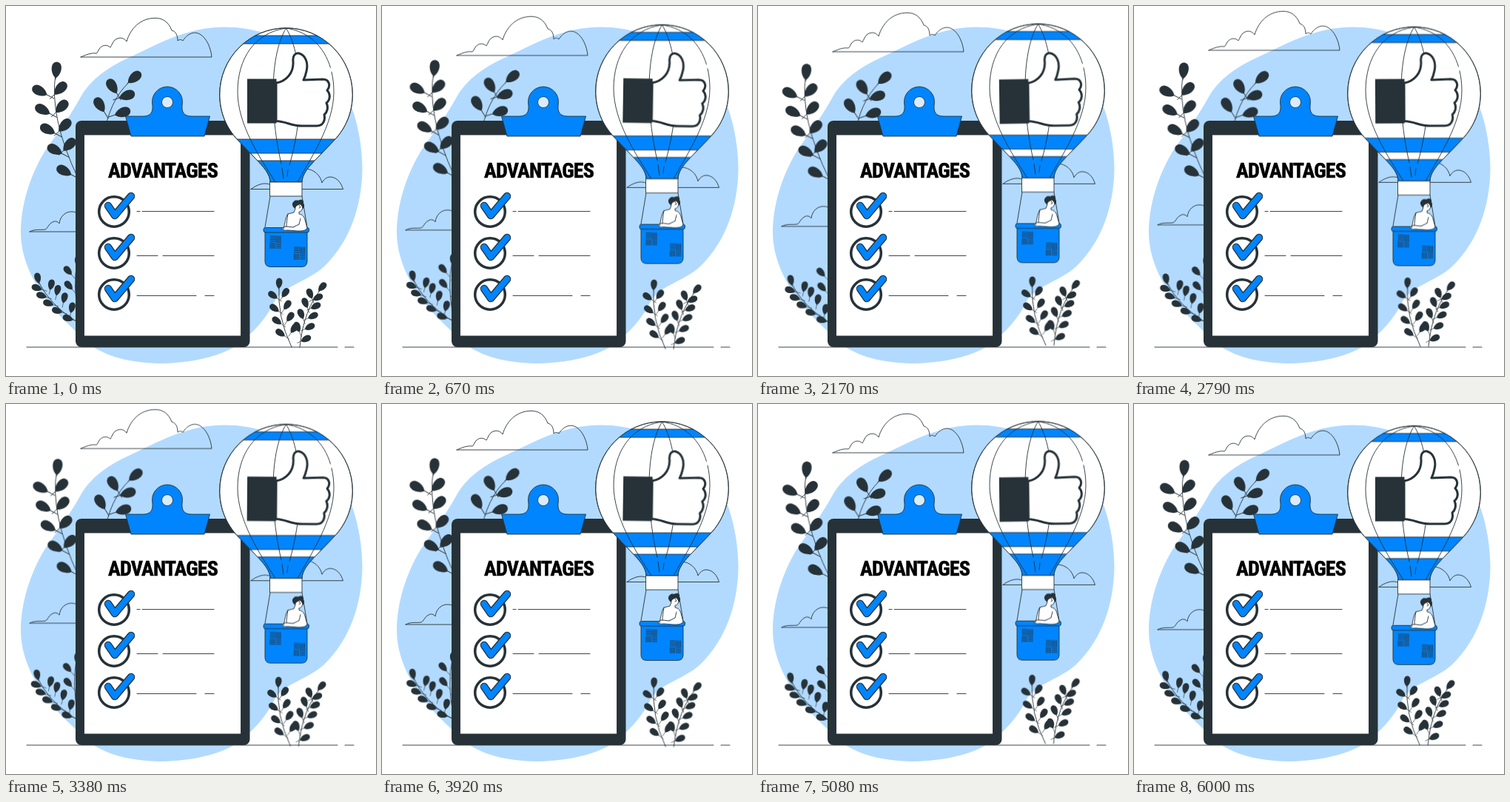
An HTML page for the animation above (6040 ms loop, 500x500 px).

```html
<!DOCTYPE html>
<html lang="en">
<head>
<meta charset="utf-8">
<title>Advantages</title>
<style>
  html, body { margin: 0; width: 100%; height: 100%; overflow: hidden; background: #fff; }
  svg { display: block; width: 100%; height: 100%; }
  .line { fill: none; stroke: #263238; stroke-width: 0.9; stroke-linecap: round; stroke-linejoin: round; }
  .blue { fill: #0085ff; stroke: #263238; stroke-width: 0.9; stroke-linejoin: round; }
  .white { fill: #fff; stroke: #263238; stroke-width: 0.9; stroke-linejoin: round; }
  .dark { fill: #263238; }
  #plants { transform-origin: 235px 269px; }
  #thumb { transform-origin: 382px 113px; }
  #title {
    font-family: "Oswald", "Roboto Condensed", "Open Sans Condensed", "Noto Sans", "Liberation Sans", sans-serif;
    font-weight: 700; font-stretch: extra-condensed; letter-spacing: -0.03em;
    text-anchor: middle; fill: #000; stroke: #000; stroke-width: 0.5;
  }
</style>
</head>
<body>
<svg viewBox="0 0 500 500">
  <defs>
    <path id="envelope" d="M288.7 119.5 A89.8 89.8 0 0 1 468.3 119.5 C468.3 144 459 165 444 181 L420 206 C408 218 400 228 400 238 H357 C357 228 349 218 337 206 L313 181 C298 165 288.7 144 288.7 119.5 Z"/>
    <clipPath id="inside"><use href="#envelope"/></clipPath>
    <path id="leaf" d="M0 10.5 C-8 5 -9.5 -11 0 -11.5 C9.5 -11 8 5 0 10.5 Z"/>
  </defs>

  <path fill="#b2daff" d="M295 28.5 C365 27 435 75 462 125 C475 152 481.500 190 481.500 220 C481 270 465 318 430 352 C406 373 378 377 364 397 C352 422 335 442 308 461 C280 477 240 483 207 483 C165 482 137 473 117 460 C97 442 76 424 60 404 C36 374 20 340 20 306 C20 270 32 230 52 197 C72 168 86 150 102 121 C118 95 143 80 172 67 C212 48 246 29 295 28.500 Z"/>

  <g class="line cloud">
    <path d="M101 69 H278 C277 57 271 43 262 38 C253 33 244 39 239 47 C237 45 234 45 232 47 C232 39 229 34 224 33 C220 22 212 16.300 202 16.300 C181 16.300 168 31 163 48 C159 42 152 42 147 46 C144 49 143 53 141 56 C137 52 130 52 126 58 C124 61 124 63 122 64 C115 63 108 66 101 69"/>
    <path d="M32 305 H140 M32 305 C39 301 46 303 53 302 C57 300 57 295 63 292 C66 290 70 291 72 294 C73 284 81 277 90 278 C94 278 98 281 100 284"/>
    <path d="M331 247.500 H455.500 C453 239 447 231 438 231 C433 231 429 235 427 239 C425 229 416 220 404 220 C390 220 382 229 379 240 C371 235 363 237 358 242 C350 237 338 242 331 247.500"/>
  </g>

  <g id="plants"></g>

  <path class="line" d="M28 461 H448 M458 461 H470"/>

  <rect class="dark" x="94" y="155" width="235.500" height="306" rx="8"/>
  <rect class="white" x="105.500" y="174" width="212" height="272"/>
  <path class="blue" d="M161.500 149 H185 C196 149 199 143 197.800 133 A20.500 20.500 0 1 1 238.200 133 C237 143 240 149 251 149 H275.500 L268 176 H169 Z"/>
  <circle cx="218" cy="130" r="7.500" fill="#d8ecff" stroke="#263238" stroke-width="0.8"/>

  <text id="title" x="212">ADVANTAGES</text>
  <g id="checks"></g>
  <path class="line" d="M177 277.500 H181 M184 277.500 H281 M177 337.500 H205 M212 337.500 H281 M177 391.500 H257 M269 391.500 H281"/>

  <g id="balloon">
    <path class="line" d="M357 257 L350 299 M400 257 L407 299"/>
    <use href="#envelope" class="white"/>
    <g clip-path="url(#inside)">
      <path class="blue" d="M280 40 H480 V51 H280 Z M280 180 H480 V199 H280 Z M280 209 H480 V240 H280 Z"/>
      <path class="line" d="M378.500 30 C335 36 313 72 313 116 C313 160 343 205 364 238"/>
      <path class="line" d="M378.500 30 C366 50 361 84 361 116 C361 155 366 188 372 213 M373 219 L375 233"/>
      <path class="line" d="M378.500 30 C391 50 397 84 397 116 C397 155 391 188 383 215 M381 221 L380 230"/>
      <path class="line" d="M378.500 30 C421 36 443 72 443 116 C443 160 412 205 394 238" stroke-dasharray="85 6 190"/>
    </g>
    <use href="#envelope" class="line"/>
    <rect class="white" x="356.500" y="238" width="43.500" height="19"/>

    <path class="blue" d="M350 302 H407 V345 Q407 352.500 399 352.500 H358 Q350 352.500 350 345 Z"/>
    <rect class="blue" x="348" y="299.500" width="61.500" height="6.500" rx="2.500"/>
    <g id="weave" class="line"></g>

    <path class="white" d="M375 302 C377 293 378 285 381 281 L389 279 L391 274 C387 269 389 264 394 264 C401 264 403 268 401 272 C400 277 398 278 396 278 L396 281 C401 282 403 285 404 289 L407 300 C405 304 400 304 394 304 L381 303 C377 303 375 304 373 301 C374 299 376 298 379 298 L388 299 L396 295"/>
    <path class="line" d="M381 281 C380 288 379 293 379 298 M398 287 L396 295 M396 269 L398 272 L396 273"/>
    <path class="dark" d="M391 274 C386 271 386 266 389 264 C392 261 394 264 397 262 C400 260 403 264 402 267 C404 269 403 273 401 274 C400 271 399 269 397 268 C394 270 392 269 391 274 Z"/>
  </g>

  <g id="thumb">
    <path fill="#fff" stroke="#263238" stroke-width="3" stroke-linejoin="round" d="M365 104 C378 102 389 91 388 75 C387 67 391 63 396 64 C404 66 409 76 406 88 C405 93 404 96 402 100 L428 99 C437 99 439 108 434 114 C439 119 438 127 433 131 C436 137 434 144 430 147 C432 155 428 162 420 162 L400 162 C385 162 379 156 365 155.500 Z"/>
    <rect class="dark" x="326" y="98.500" width="39.500" height="60"/>
  </g>
</svg>

<script>
  const LOOP = 6040;
  const byId = id => document.getElementById(id);

  // Point on a quadratic curve [x0, y0, cx, cy, x1, y1]
  const along = (q, t) => [0, 1].map(i =>
    (1 - t) ** 2 * q[i] + 2 * t * (1 - t) * q[i + 2] + t * t * q[i + 4]);

  const leaf = (x, y, angle, size, stalk) =>
    `<g transform="translate(${x} ${y}) rotate(${angle}) scale(${size})">
      <path class="line" d="M0 0 V${stalk}"/><use href="#leaf" class="dark"/></g>`;

  function row(curve, count, angle, size, stalk) {
    let out = '';
    for (let i = 0; i < count; i++) {
      out += leaf(...along(curve, i / Math.max(1, count - 1)), angle, size, stalk);
    }
    return out;
  }

  function plant({ stem: s, tip, left, right, size }) {
    return `<path class="line" d="M${s[0]} ${s[1]} Q${s.slice(2)}"/>`
      + leaf(...tip, size, 12)
      + row(left[0], left[1], left[2], size, 21)
      + row(right[0], right[1], right[2], size, 19);
  }

  const plants = [
    { stem: [67, 92, 58, 150, 97, 232], tip: [68, 87, 5], size: 1,
      left: [[46, 115, 51, 165, 79, 223], 5, -62],
      right: [[73, 112, 74, 148, 85, 188], 4, 45] },
    { stem: [172, 98, 144, 120, 134, 165], tip: [173, 97, 50], size: 1,
      left: [[144, 109, 135, 121, 127, 134], 2, -32],
      right: [[163, 121, 161, 132, 157, 144], 2, 72] },
    { stem: [43, 370, 58, 404, 98, 428], tip: [43, 368, -12], size: 0.66,
      left: [[42, 381, 52, 402, 84, 422], 5, -72],
      right: [[61, 377, 73, 386, 89, 408], 4, 12] },
    { stem: [96, 346, 90, 380, 98, 420], tip: [97, 344, 10], size: 0.66,
      left: [[84, 358, 83, 368, 85, 378], 2, -42],
      right: [[104, 364, 104, 376, 104, 386], 2, 45] },
    { stem: [369, 378, 366, 420, 386, 461], tip: [369, 375, 4], size: 0.66,
      left: [[361, 391, 363, 418, 371, 442], 4, -55],
      right: [[377, 388, 380, 413, 389, 436], 4, 35] },
    { stem: [427, 381, 402, 410, 397, 461], tip: [427, 380, 42], size: 0.66,
      left: [[411, 389, 401, 406, 394, 434], 4, -22],
      right: [[421, 394, 416, 416, 405, 450], 5, 65] }
  ];
  byId('plants').innerHTML = plants.map(plant).join('');

  const tick = 'M138 270 L147 283 L169 257';
  byId('checks').innerHTML = [278, 334, 390].map(y => `
    <circle cx="146" cy="${y}" r="20.300" fill="#fff" stroke="#263238" stroke-width="3.500"/>
    <g transform="translate(0 ${y - 278})" fill="none" stroke-linecap="round" stroke-linejoin="round">
      <path d="${tick}" stroke="#263238" stroke-width="10.500"/>
      <path d="${tick}" stroke="#0085ff" stroke-width="8"/>
    </g>`).join('');

  // Alternating blocks of short horizontal and vertical strokes
  function weave(x, y) {
    let d = '';
    for (let block = 0; block < 4; block++) {
      const bx = x + (block % 2) * 8;
      const by = y + (block >> 1) * 9;
      for (let i = 0; i < 4; i++) {
        d += block === 0 || block === 3
          ? `M${bx} ${by + i * 2.3} h6.500 `
          : `M${bx + i * 2} ${by} v7.500 `;
      }
    }
    return `<path d="${d}"/>`;
  }
  byId('weave').innerHTML = weave(357, 311) + weave(389.5, 326);

  // Pick the type size that gives the heading its width
  const title = byId('title');
  title.style.fontSize = '30px';
  const size = Math.min(35, 30 * 148 / title.getComputedTextLength());
  title.style.fontSize = size + 'px';
  title.setAttribute('y', 222 + size * 0.357);

  const loop = (el, frames, duration) =>
    el.animate(frames, { duration, iterations: Infinity, easing: 'linear' });

  const float = [0, -10, 0].map(y => ({ transform: `translateY(${y}px)` }));
  const wind = [[0, 0], [0.25, 1], [0.75, -1], [1, 0]]
    .map(([offset, deg]) => ({ offset, transform: `rotate(${deg}deg)` }));

  loop(document.querySelector('.cloud'), float, LOOP);
  loop(byId('balloon'), float, LOOP / 2);
  loop(byId('plants'), wind, LOOP / 2);
  loop(byId('thumb'), wind, LOOP / 2);
</script>
</body>
</html>
```
